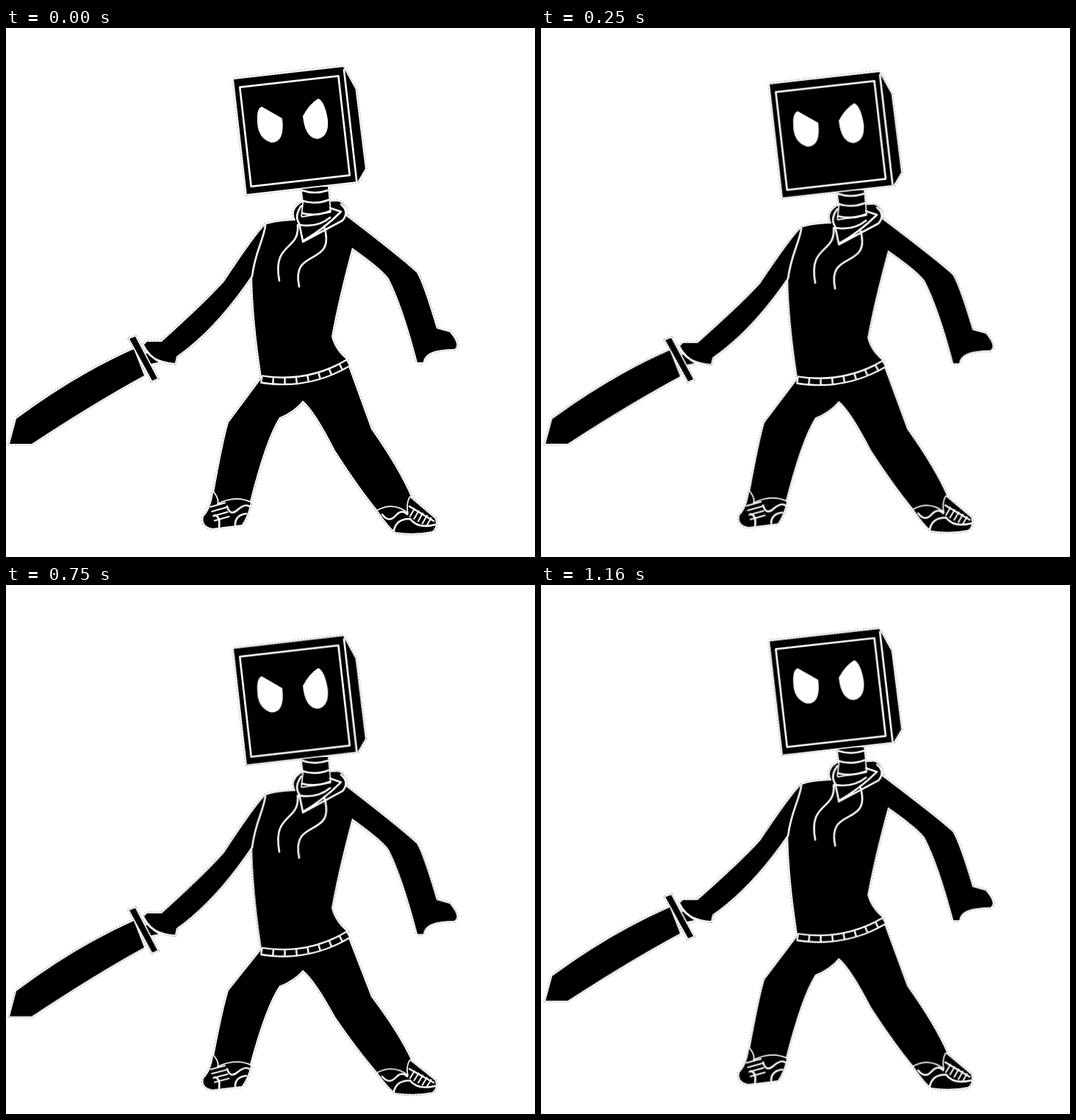
These frames come from a looping animation (720x720 px, 1.26 s). An HTML page:

```html
<!DOCTYPE html>
<html lang="en">
<head>
<meta charset="utf-8">
<title>Box-headed fighter</title>
<style>
  html, body { margin: 0; width: 100%; height: 100%; overflow: hidden; background: #fff; }
  svg { display: block; width: 100%; height: 100%; }

  .rim, .ink, .line { stroke-linejoin: round; }
  .rim { fill: none; stroke: #999; stroke-width: 5; stroke-dasharray: 2 2; }
  .ink { fill: #000; stroke: #fff; stroke-width: 3.4; paint-order: stroke; }
  .line { fill: none; stroke: #fff; stroke-width: 2.6; stroke-linecap: round; }
  .eyes { fill: #fff; }

  /* Ladder patterns are thick strokes cut by dashes. */
  .band { fill: none; stroke: #fff; stroke-width: 11.5; }
  .links { fill: none; stroke: #000; stroke-width: 7; stroke-dasharray: 13.5 2.4; }
  .laces { fill: none; stroke: #fff; stroke-dasharray: 2 4.5; }

  /* The figure bobs in hard steps; the legs squash while the feet stay put. */
  .upper, .lower { transform-origin: 0 0; animation: bob 1260ms step-end infinite; }
  .lower { animation-name: squash; }

  @keyframes bob {
    0% { transform: none; }
    19.841%, 79.365%, 100% { transform: translate(1.3px, 7.7px) scaleY(.986); }
    39.683% { transform: translateY(6.9px) scaleY(1.022); }
    59.524% { transform: translateY(16.2px) scaleY(1.0085); }
  }
  @keyframes squash {
    0% { transform: none; }
    19.841%, 79.365%, 100% { transform: translate(1.3px, 7.7px) scaleY(.986); }
    39.683% { transform: translateY(40.5px) scaleY(.947); }
    59.524% { transform: translateY(50.5px) scaleY(.934); }
  }
</style>
</head>
<body>
<svg viewBox="0 0 720 720">
  <defs>
    <g id="legs">
      <path d="M347 478 L303 537 Q296 560 282 638 L286 655 L331 648 Q353 560 372 530
        Q392 522 404 507 Q420 520 448 575 Q480 625 507 658 L550 666 L552 640
        Q535 600 497 546 L464 455Z"/>
      <path d="M282 632 Q290 642 287 649 Q312 636 333 646 Q329 664 321 676 L281 681
        Q266 678 269 665 Q279 655 282 632Z"/>
      <path d="M506 657 Q528 645 548 662 Q545 648 550 639 L584 668 Q587 680 580 685
        Q555 690 530 686 Q520 678 506 657Z"/>
    </g>

    <g id="sword">
      <path d="M174 437 Q95 472 14 532 L5 566 H35 Q120 510 188 473Z"/>
      <path d="M186 445 L206 438 L212 454 L192 458Z"/>
      <path d="M168 423 L176 420 L206 477 L199 480Z"/>
    </g>

    <g id="body">
      <path d="M394 262 Q366 263 353 268 Q340 280 297 345 Q270 375 212 427 L192 427 L187 432
        Q196 453 230 456 L232 447 Q285 410 335 336 Q336 400 349 482 Q415 492 467 454
        Q448 440 443 420 Q452 370 471 299 Q512 328 521 341 Q540 378 560 455 H568
        Q569 437 610 437 Q619 432 604 414 L586 409 Q568 348 559 333 Q540 315 463 256
        Q464 240 452 236 L402 238 Q387 247 394 262Z"/>
      <path d="M402 216 L405 238 L403 256 L441 250 L438 216Z"/>
    </g>

    <g id="box" transform="translate(310 70) rotate(-6.5)">
      <path d="M0 0 H150 L163 32 L164 141 L152 157 H0Z"/>
    </g>
  </defs>

  <g class="lower">
    <use href="#legs" class="rim"/>
    <use href="#legs" class="ink"/>
    <path class="laces" stroke-width="22" d="M288 648 L294 669"/>
    <path class="laces" stroke-width="14" d="M552 659 L580 675"/>
    <path class="line" d="M284 663 Q292 665 290 679 M301 651 Q305 665 315 656 T331 651
      M312 676 Q312 663 327 661"/>
    <path class="line" d="M512 662 Q521 674 530 664 T546 662 M528 684 Q531 668 550 668
      Q560 682 584 676 M549 651 L582 671"/>
  </g>

  <g class="upper">
    <use href="#sword" class="rim"/>
    <use href="#body" class="rim"/>
    <use href="#box" class="rim"/>
    <use href="#sword" class="ink"/>
    <use href="#body" class="ink"/>
    <use href="#box" class="ink"/>

    <g class="line" transform="translate(310 70) rotate(-6.5)">
      <rect x="7" y="11.5" width="135" height="136"/>
      <path d="M150.5 4 V156"/>
    </g>
    <path class="eyes" d="M348 107 L376 123 Q380 156 361 156 Q342 150 342 126 Q341 110 348 107Z
      M425 96 Q413 103 404 120 Q407 150 424 151 Q440 148 438 125 Q434 100 425 96Z"/>

    <g class="line">
      <path d="M403 221 q17 6 35 0 m-35 14 q18 6 36 -1 m-36 18 q20 5 38 -3"/>
      <path d="M402 242 Q392 256 399 266 L404 290 Q432 274 456 250 L441 245
        M400 268 Q424 272 441 258 M404 291 L458 262 Q468 250 456 240"/>
      <path d="M397 268 C400 304 362 291 372 344 M433 270 C450 327 387 297 399 352"/>
      <path d="M353 269 C350 290 339 305 335 338"/>
      <path d="M187 432 Q194 447 212 456"/>
    </g>
    <path class="band" d="M347 478 Q412 488 467 455"/>
    <path class="links" d="M349 478 Q412 488 465 456"/>
  </g>
</svg>
</body>
</html>
```
